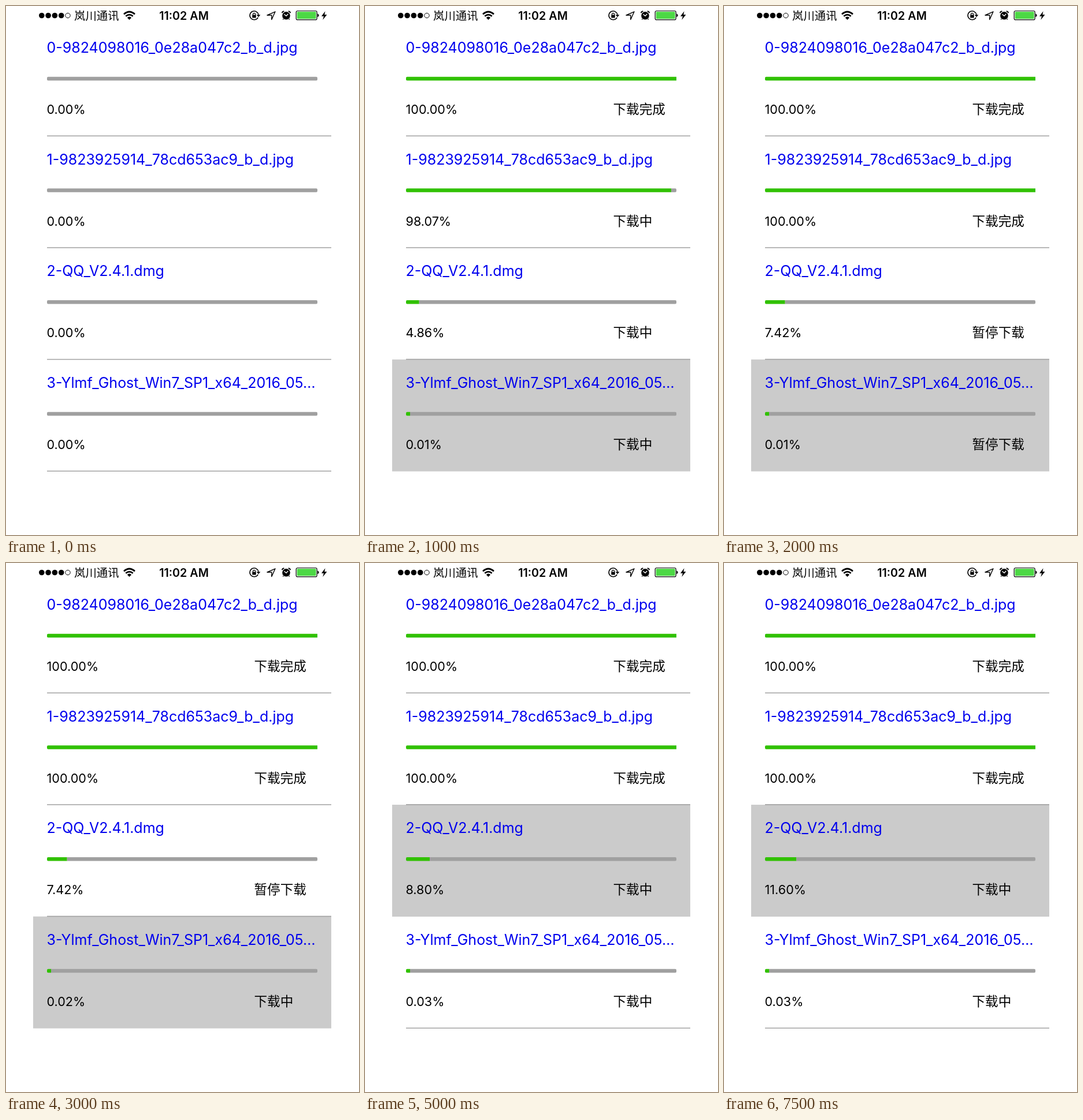
Animation, 611 px wide and 917 px high, one loop 8 s. Source, as an HTML page:

```html
<!DOCTYPE html>
<html lang="zh">
<head>
<meta charset="utf-8">
<title>Downloads</title>
<style>
html, body { margin: 0; width: 100%; height: 100%; overflow: hidden; background: #fff; }
svg { display: block; }
text { font-family: Inter, "Noto Sans CJK SC", "Noto Sans CJK", sans-serif; }
.title { font-size: 25px; fill: #0000ee; }
.percent { font-size: 21.6px; }
.status { font-size: 22.6px; font-family: "Noto Sans CJK SC", "Noto Sans CJK", sans-serif; }
.carrier { font-size: 19.4px; font-family: "Noto Sans CJK SC", "Noto Sans CJK", sans-serif; }
.clock { font-size: 19.7px; font-weight: 600; text-anchor: middle; }
.line { fill: none; stroke: #000; stroke-width: 1.5; }
</style>
</head>
<body>
<svg width="611" height="917" viewBox="0 0 611 917">
  <g id="dots"></g>
  <text class="carrier" x="118" y="24">岚川通讯</text>
  <g class="line" style="stroke-width:2.7">
    <path d="M204 14.2Q213.5 5.8 223 14.2M207.3 17.8Q213.5 12.4 219.7 17.8"/>
    <path d="M213.5 24L209.8 20.2Q213.5 17 217.2 20.2Z" fill="#000" stroke="none"/>
  </g>
  <text class="clock" x="308" y="23.5">11:02 AM</text>
  <g class="line">
    <path d="M436.2 19.8A7.5 7.5 0 1 1 437 15.5"/>
    <path d="M433.6 15.2H440.4L437 19.3Z" fill="#000" stroke="none"/>
    <path d="M427.5 16V14.3A2 2 0 0 1 431.5 14.3V16" stroke-width="1.3"/>
    <rect x="426.3" y="15.5" width="6.4" height="5" fill="#000" stroke="none"/>
    <path d="M466 9.8L459.8 23.5V16H452Z" stroke-width="1.4" stroke-linejoin="round"/>
  </g>
  <path d="M477.8 12.2Q478.2 9.4 481.4 9.2M488.6 9.2Q491.8 9.4 492.2 12.2" class="line" style="stroke-width:1.8"/>
  <path d="M480.8 21.5L479.4 23.6M489.2 21.5L490.6 23.6" class="line"/>
  <circle cx="485" cy="16.8" r="7.2" stroke="#fff" stroke-width="0.8"/>
  <path d="M481.5 14.3L485 17.3L488.3 13.8" class="line" style="stroke:#fff;stroke-width:1.3"/>
  <rect x="502.2" y="8.5" width="36" height="15.4" rx="2.5" class="line" style="stroke-width:1.2"/>
  <rect x="503.8" y="10.1" width="32.8" height="12.2" rx="1.2" fill="#4cd845"/>
  <path d="M539.3 13.2Q541.6 13.7 541.6 16.2T539.3 19.2Z"/>
  <path d="M552.5 9L546 17.8H550L548.3 24L555.5 15H551.3Z"/>
  <g id="list"></g>
</svg>
<script>
const $ = id => document.getElementById(id);
const LOOP = 8000, STEP = 500, PITCH = 193.67;
const LEFT = 71, BAR = 468;
const WAIT = '', BUSY = '下载中', PAUSED = '暂停下载', DONE = '下载完成';
const titles = [
  '0-9824098016_0e28a047c2_b_d.jpg',
  '1-9823925914_78cd653ac9_b_d.jpg',
  '2-QQ_V2.4.1.dmg',
  '3-Ylmf_Ghost_Win7_SP1_x64_2016_05…'
];

$('dots').innerHTML = [0, 1, 2, 3, 4].map(i => {
  const hollow = i === 4;
  return `<circle cx="${61.8 + i * 11.3}" cy="16.5" r="${hollow ? 4.2 : 4.8}"` +
    (hollow ? ' fill="none" stroke="#000"/>' : '/>');
}).join('');

// Percentages of the four downloads after k half-seconds
function progress(k) {
  const third = k < 4 ? [0, 2.3, 4.86, 7.42][k]
    : k < 8 ? 7.42
    : k < 11 ? 7.88 + (k - 8) * 0.46
    : 8.8 + (k - 10) * 0.56;
  const fourth = k < 2 ? k * 0.004 : k < 6 ? 0.01 : k < 10 ? 0.02 : 0.03;
  return [[0, 82, 100][Math.min(k, 2)], [0, 45, 98.07, 100][Math.min(k, 3)], third, fourth];
}

function status(i, k, value) {
  if (!k) return WAIT;
  if (value === 100) return DONE;
  const paused = i === 2 ? k >= 3 && k < 8 : i === 3 && (k === 4 || k === 5);
  return paused ? PAUSED : BUSY;
}

function selected(k) {
  if (!k) return -1;
  return k === 3 || k >= 8 ? 2 : 3;
}

// Horizontal bar with corner radius l on the left and r on the right
function bar(from, to, color, l, r) {
  const top = 122.7, bottom = 129.2;
  return `<path fill="${color}" d="M${LEFT + from + l} ${top}H${LEFT + to - r}q${r} 0 ${r} ${r}` +
    `V${bottom - r}q0 ${r} ${-r} ${r}H${LEFT + from + l}q${-l} 0 ${-l} ${-l}V${top + l}q0 ${-l} ${l} ${-l}Z"/>`;
}

function row(i, k, value) {
  const on = selected(k) === i;
  const fill = value && Math.max(7, BAR * value / 100);
  const rule = y => `<rect x="71" y="${y}" width="492" height="1.5" fill="#a2a2a2"/>`;
  return `<g transform="translate(0 ${i * PITCH})">` +
    (on ? '<rect x="47" y="31.7" width="516" height="194" fill="#cbcbcb"/>' + rule(30.8) : rule(224.5)) +
    `<text class="title" x="70.5" y="81">${titles[i]}</text>` +
    (fill ? bar(0, fill, '#31c103', 2, 0) : '') +
    (fill < BAR ? bar(fill, BAR, '#a0a0a0', fill ? 0 : 2, 2) : '') +
    `<text class="percent" x="70.5" y="187">${value.toFixed(2)}%</text>` +
    `<text class="status" x="429.5" y="187">${status(i, k, value)}</text></g>`;
}

let shown = -1;
function draw(now) {
  const k = Math.floor(now % LOOP / STEP);
  if (k !== shown) {
    shown = k;
    $('list').innerHTML = progress(k).map((value, i) => row(i, k, value)).join('');
  }
}

const start = performance.now();
function tick() {
  draw(performance.now() - start);
  requestAnimationFrame(tick);
}
tick();
</script>
</body>
</html>
```
